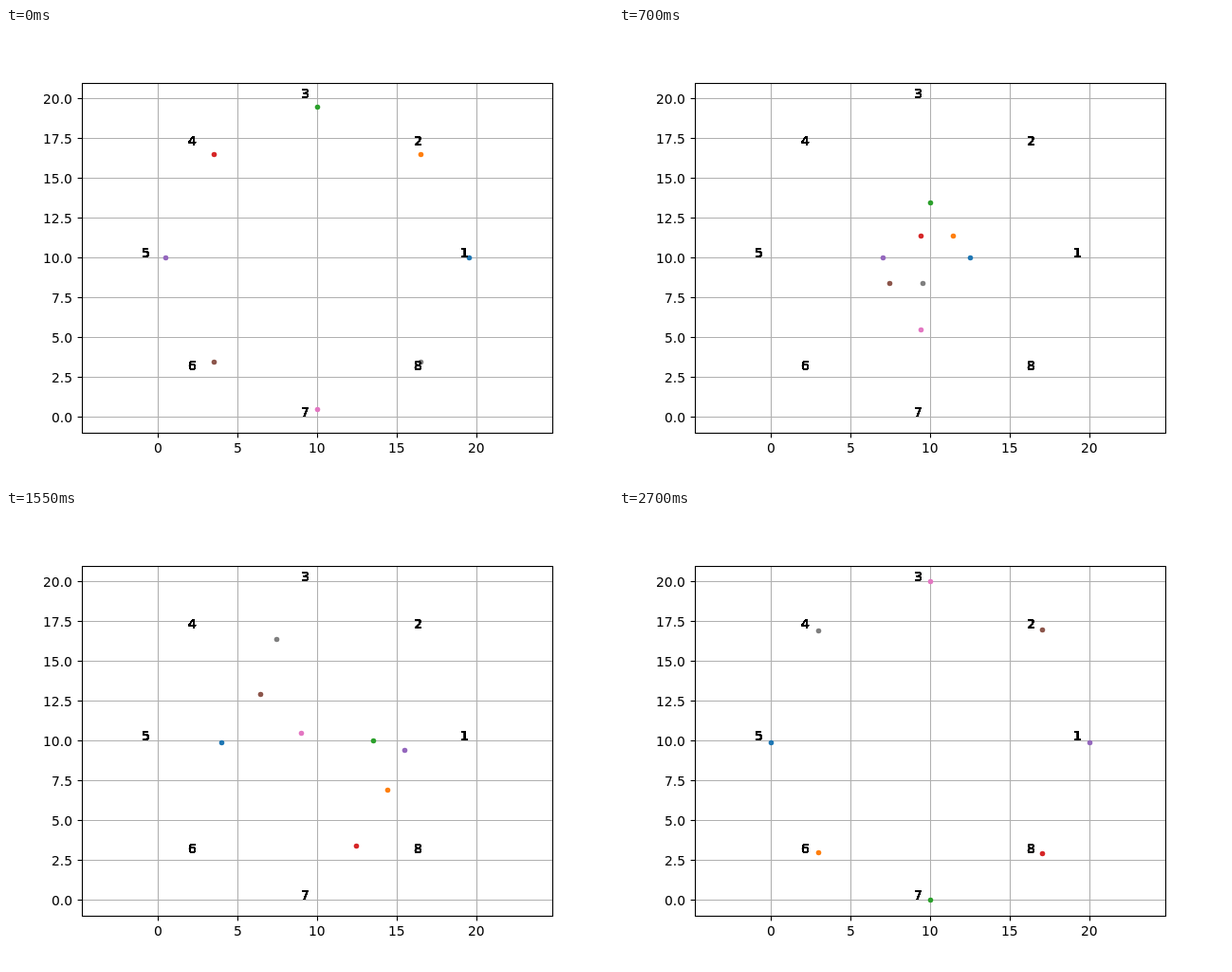
An HTML page for the animation above (5.05 s loop, 640 by 480 pixels).

```html
<!DOCTYPE html>
<html lang="en">
<head>
<meta charset="utf-8">
<title>Agents crossing a circle</title>
<style>
html, body { margin: 0; width: 100%; height: 100%; overflow: hidden; background: #fff; }
svg { display: block; width: 640px; height: 480px; }
text { font: 13.89px "DejaVu Sans", sans-serif; fill: #000; }
.grid { stroke: #b0b0b0; stroke-width: 1.11; }
.axis { stroke: #000; stroke-width: 1.11; fill: none; }
</style>
</head>
<body>
<svg id="plot" viewBox="0 0 640 480"></svg>
<script>
const STEP = 50, STEPS = 54, LOOP = 5050;
const SPEED = 0.5;   // plot units per step on each axis
const DIGIT = 8.84, POINT = 4.41;   // glyph advances
const plot = document.getElementById('plot');

function add(tag, attrs, text) {
  const el = document.createElementNS('http://www.w3.org/2000/svg', tag);
  for (const name in attrs) el.setAttribute(name, attrs[name]);
  if (text !== undefined) el.textContent = text;
  return plot.appendChild(el);
}
const line = (cls, x1, y1, x2, y2) => add('line', { class: cls, x1, y1, x2, y2 });
const toX = v => Math.round(160 + 16.8 * v);
const toY = v => Math.round(410.4 - 16.8 * v);

// Text begins on a whole pixel; align is the share of its width left of x
function label(x, y, text, align) {
  const width = [...text].reduce((w, c) => w + (c === '.' ? POINT : DIGIT), 0);
  return add('text', { x: Math.round(x - align * width), y }, text);
}

for (let v = 0; v <= 20; v += 5) {
  const x = toX(v) + 0.5;
  line('grid', x, 58, x, 427);
  line('axis', x, 427.5, x, 432.4);
  label(x - 0.5, 448, String(v), 0.5);
}
for (let v = 0; v <= 20; v += 2.5) {
  const y = toY(v) + 0.5;
  line('grid', 80, y, 576, y);
  line('axis', 75.6, y, 80.5, y);
  label(70.3, y + 5.5, v.toFixed(1), 1);
}

const approach = (from, to) => from + Math.max(-SPEED, Math.min(SPEED, to - from));

// Agents close in on an inner ring, then head for each [step, x, y] from that step on
function agent(i, fill, ...headings) {
  const a = i * Math.PI / 4;
  const dir = [Math.cos(a), Math.sin(a)].map(c => Math.round(10 * c));
  const inward = (d, by) => d - Math.sign(d) * by;
  const mid = i % 2 ? 9.92 : 10;
  let [x, y] = dir.map(d => 10 + inward(d, 0.5));
  let target = dir.map(d => mid + inward(d, 5.5));
  const path = [[x, y]];
  for (let k = 0; k < STEPS; k++) {
    const next = headings.find(h => h[0] === k);
    if (next) target = next.slice(1);
    x = approach(x, target[0]);
    y = approach(y, target[1]);
    path.push([x, y]);
  }
  return { dot: add('circle', { r: 2.78, fill }), path };
}

const agents = [
  agent(0, '#1f77b4', [10, 0, 10], [14, 0, 8], [21, 0, 9.92]),
  agent(1, '#ff7f0e', [14, 14.42, 11.42], [16, 14.42, 6.92], [31, 3, 1.42], [43, 3, 3]),
  agent(2, '#2ca02c', [10, 10, 13.5], [18, 13.5, 13.5], [21, 13.5, 11.5], [28, 13.5, 0],
    [31, 10.5, 0], [44, 11, 0], [49, 10, 0]),
  agent(3, '#d62728', [12, 11.92, 11.42], [15, 11.92, 2.42], [30, 17, 2.42], [36, 17, 2.92]),
  agent(4, '#9467bd', [11, 20, 10], [14, 20, 11.5], [19, 20, 8.95], [30, 20, 9.92]),
  agent(5, '#8c564b', [12, 4.42, 8.42], [16, 4.42, 12.92], [22, 5.95, 12.92],
    [30, 17, 12.92], [31, 17, 18.42], [43, 17, 17]),
  agent(6, '#e377c2', [9, 9.42, 5.5], [21, 8, 20], [29, 12, 20], [40, 9.5, 20], [49, 10, 20]),
  agent(7, '#7f7f7f', [10, 7.42, 8.42], [15, 7.42, 17.42], [21, 8.45, 17.42],
    [29, 3, 17.42], [36, 3, 16.92])
];

add('rect', { class: 'axis', x: 80.5, y: 58.5, width: 496, height: 369 });

// Goal numbers, darkened by repeated overprinting
const overprint = Array(30).fill('0 0 0 #000').join();
for (let i = 0; i < 8; i++) {
  const a = i * Math.PI / 4;
  const goal = label(toX(9 + 10 * Math.cos(a)), toY(10 + 10 * Math.sin(a)), String(i + 1), 0);
  goal.style.textShadow = overprint;
}

function draw(ms) {
  const k = Math.min(STEPS, Math.floor(ms % LOOP / STEP));
  for (const { dot, path } of agents) {
    dot.setAttribute('cx', toX(path[k][0]) + 0.5);
    dot.setAttribute('cy', toY(path[k][1]) + 0.5);
  }
}

const start = performance.now();
function tick() {
  draw(performance.now() - start);
  requestAnimationFrame(tick);
}
draw(0);
requestAnimationFrame(tick);
</script>
</body>
</html>
```
